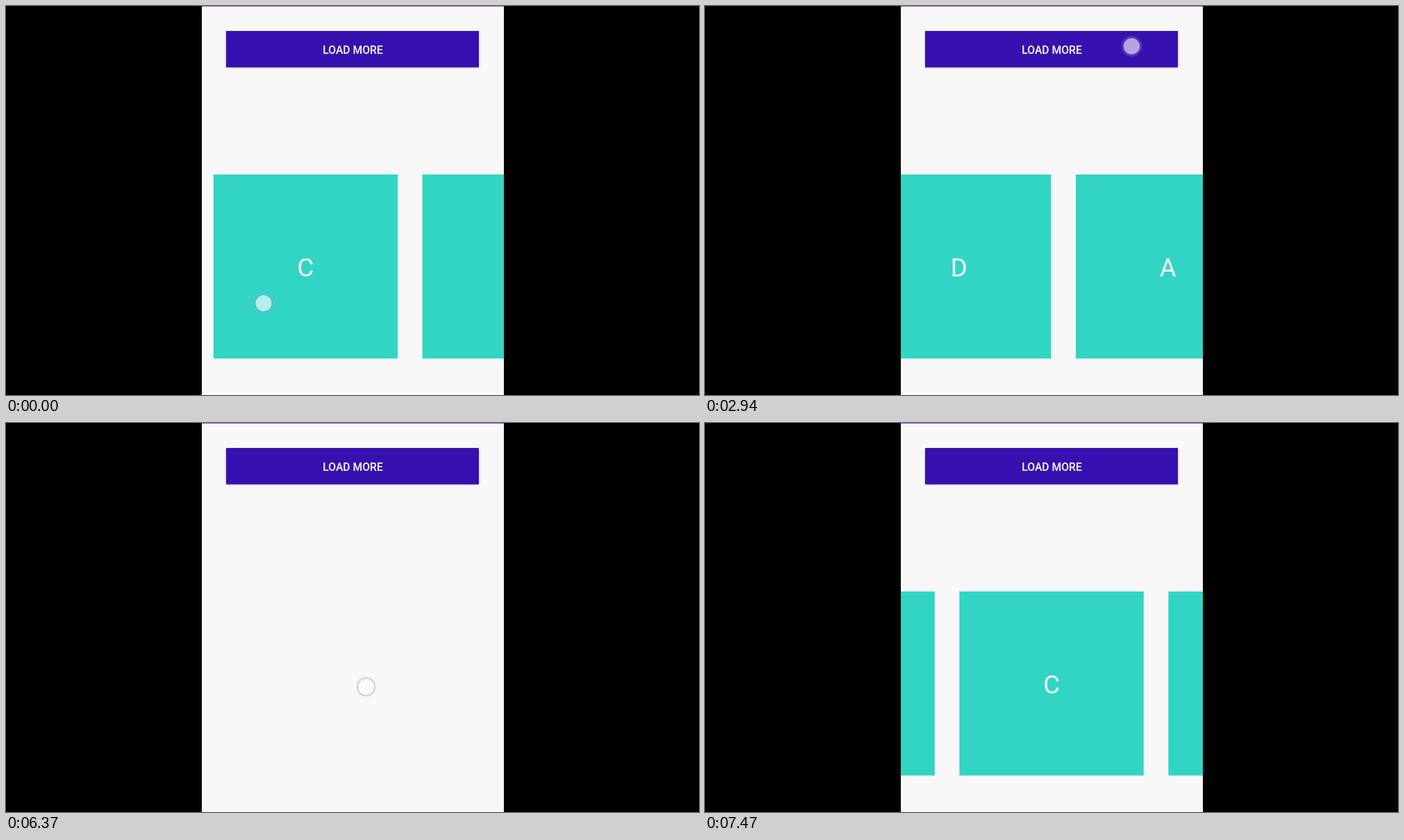
An HTML page with a canvas for the animation above (7500 ms loop, 998 px wide and 561 px high).

```html
<!DOCTYPE html>
<html lang="en">
<head>
<meta charset="utf-8">
<title>Load more</title>
<style>
html, body { margin: 0; width: 100%; height: 100%; overflow: hidden; background: #000; }
canvas { display: block; }
</style>
</head>
<body>
<canvas id="stage" width="998" height="561"></canvas>
<script>
const ctx = document.getElementById('stage').getContext('2d');
const LOOP = 7500, FRAME = 33.3;
const SCREEN = { x: 282, w: 435 };
const BUTTON = { x: 317, y: 36, w: 364, h: 52.5 };
const CARD = 265.4, PITCH = 300.9;
const CENTER = 366.4, SHIFT = 133.3, GONE = -302;
const TAP_STARTS = [1200, 2170, 2940, 3540, 4100, 4570];
const TAP_DELAY = 90;
const SWIPES = [
  { start: 0, release: 60, x: 371, y: 428.7 },
  { start: 6370, release: 6440, x: 518.5, y: 380.5 },
  { start: 6900, release: 7137, x: 453, y: 387.3 }
];

const clamp = v => Math.max(0, Math.min(1, v));

const elapsed = (t, start) => Math.floor((t - start) / FRAME) * FRAME;

function glide(t, start, length, from, to, power = 2.5) {
  const p = clamp(elapsed(t, start) / length);
  return from + (to - from) * (1 - Math.pow(1 - p, power));
}

const tapsDone = t => TAP_STARTS.filter(start => t >= start + TAP_DELAY).length;

// Left edge of card D
function scrollAt(t) {
  const dragged = CENTER + PITCH / 3;
  if (t >= 7170) return glide(t, 7170, 8 * FRAME, dragged, CENTER + PITCH);
  if (t >= 6900) return glide(t, 6900, 8 * FRAME, CENTER, dragged, 1);
  if (t >= 6370) return glide(t, 6370, 15 * FRAME, GONE, CENTER);
  const taps = tapsDone(t);
  if (taps > 4) return GONE;
  if (taps > 0) return CENTER - SHIFT * (taps - 1);
  return glide(t, 0, 12 * FRAME, CENTER + SHIFT * 1.75, CENTER);
}

function label(text, x, y, font) {
  ctx.font = font + ' Roboto, sans-serif';
  ctx.textAlign = 'center';
  ctx.fillStyle = '#fff';
  ctx.fillText(text, x, y);
}

function disc(x, y, r, color) {
  ctx.fillStyle = color;
  ctx.beginPath();
  ctx.arc(x, y, r, 0, Math.PI * 2);
  ctx.fill();
}

function ring(x, y, r, width, color) {
  ctx.lineWidth = width;
  ctx.strokeStyle = color;
  ctx.beginPath();
  ctx.arc(x, y, r, 0, Math.PI * 2);
  ctx.stroke();
}

function drawCards(t) {
  const letters = tapsDone(t) ? 'BCDA' : 'BCD';
  [...letters].forEach((letter, i) => {
    const x = scrollAt(t) + (i - 2) * PITCH;
    ctx.fillStyle = '#32d5c4';
    ctx.fillRect(x, 243, CARD, CARD);
    label(letter, x + CARD / 2, 389.7, '36.5px');
  });
}

function drawTouch(x, y, alpha) {
  ctx.save();
  ctx.globalAlpha = clamp(alpha);
  disc(x, y, 11.8, 'rgba(255, 255, 255, .62)');
  ring(x, y, 12.5, 1.6, 'rgba(125, 115, 190, .36)');
  ring(x, y, 14, 2.5, 'rgba(190, 180, 250, .14)');
  ctx.restore();
}

function drawButton(t) {
  const { x, y, w, h } = BUTTON;
  const n = TAP_STARTS.findLastIndex(start => t >= start);
  const age = n < 0 ? Infinity : elapsed(t, TAP_STARTS[n]);
  const p = clamp(age / (430 - 60 * n));
  const glow = p < 1 ? Math.sin(Math.PI * p) : 0;
  const touch = { x: 628.5 - 7 * n, y: 52 + 3 * n };

  ctx.save();
  ctx.shadowColor = 'rgba(70, 45, 130, .4)';
  ctx.shadowBlur = 3 + 4 * glow;
  ctx.shadowOffsetY = 0.7 + glow;
  ctx.fillStyle = '#3611b0';
  ctx.fillRect(x, y, w, h);
  ctx.restore();

  if (glow > 0) {
    ctx.save();
    ctx.beginPath();
    ctx.rect(x, y, w, h);
    ctx.clip();
    disc(touch.x, touch.y, 20 + 300 * p, `rgba(255, 255, 255, ${0.14 * glow})`);
    ctx.restore();
  }
  label('LOAD MORE', 499.5, 68.6, '500 15.7px');
  if (n >= 0) drawTouch(touch.x, touch.y, 1 - (age - TAP_DELAY) / 80);
}

function drawSwipes(t) {
  for (const { start, release, x, y } of SWIPES) {
    if (t < start) continue;
    const alpha = 1 - Math.max(0, elapsed(t, release)) / (2 * FRAME);
    drawTouch(x + scrollAt(t) - scrollAt(start), y, alpha);
  }
}

function draw(t) {
  ctx.fillStyle = '#000';
  ctx.fillRect(0, 0, 998, 561);
  ctx.save();
  ctx.beginPath();
  ctx.rect(SCREEN.x, 0, SCREEN.w, 561);
  ctx.clip();
  ctx.fillStyle = '#f8f8f8';
  ctx.fillRect(SCREEN.x, 0, SCREEN.w, 561);
  ctx.fillStyle = '#9563f2';
  ctx.fillRect(SCREEN.x, 0, SCREEN.w, 1);
  drawCards(t);
  drawButton(t);
  drawSwipes(t);
  ctx.restore();
}

const began = performance.now();
function tick() {
  draw((performance.now() - began) % LOOP);
  requestAnimationFrame(tick);
}
tick();
</script>
</body>
</html>
```
